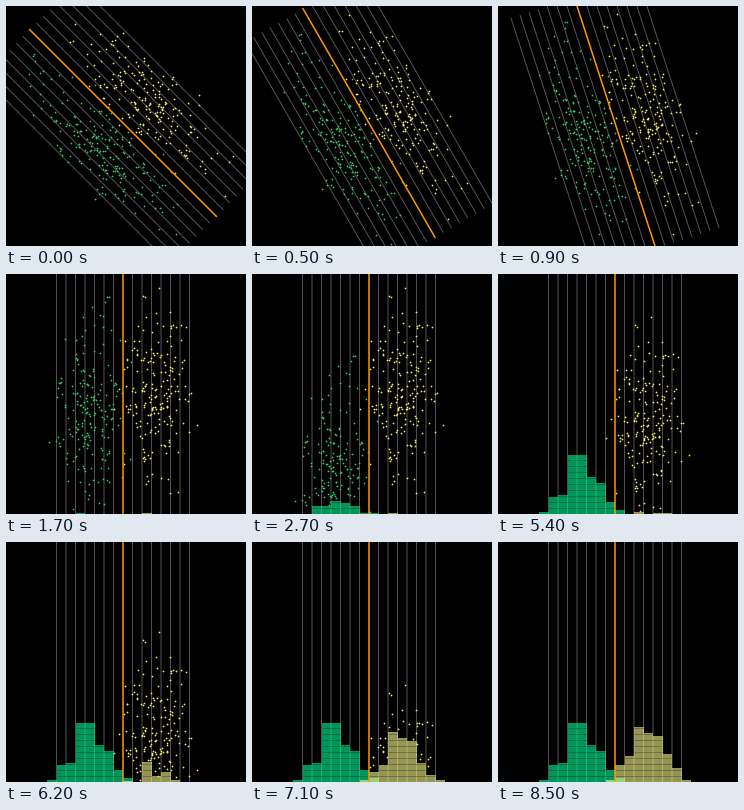
Write a matplotlib script that moves like this. It is 240x240 px and loops after 8.6 s.

```python
import numpy as np
import matplotlib.pyplot as plt
from matplotlib.animation import FuncAnimation
from matplotlib.collections import LineCollection
from matplotlib.patches import Rectangle

SIZE, DPI = 240, 100
PX = 72 / DPI
FRAMES, STEP = 86, 100
MID, HALF = 117, 132           # pivot and half length of the lines
BIN = 9.5
SPEED = 5.88                   # fall per frame
UNIT = 1.2                     # bar height per point
TURN = 15                      # frames until upright
ROW = 6                        # spacing of the stripes in a bar

rng = np.random.default_rng(12)


def rotate(pts, angle):
    u, v = (np.asarray(pts, float) - MID).T
    c, s = np.cos(angle), np.sin(angle)
    return np.column_stack([MID + u * c + v * s, MID - u * s + v * c])


class Cloud:
    """Normal cloud sorted into bins, each point falling onto its bar."""

    def __init__(self, ax, profile, left, mean, spread, start, dot, fill):
        self.start = start
        self.bins, self.bars = [], []
        for i, n in enumerate(profile):
            x = left + i * BIN
            top = mean - spread * np.sqrt(2 * np.log(n))
            xs = rng.uniform(x, x + BIN, n)
            ys = np.maximum(rng.normal(mean, spread, n), top)
            self.bins.append(np.column_stack([xs, -np.sort(-ys)]))
            self.bars.append(ax.add_patch(Rectangle(
                (x, SIZE), BIN, 0, fc=fill, alpha=0.6, lw=0, zorder=3)))
        self.dots, = ax.plot([], [], "o", ms=1.75 * PX, mew=0, color=dot,
                             snap=False, zorder=2)
        self.rows = ax.add_collection(LineCollection(
            [], colors="black", alpha=0.3, linewidths=0.8 * PX, zorder=4))

    def update(self, frame, angle):
        drop = SPEED * max(0, frame - self.start)
        flying, rows = [], []
        for pts, bar in zip(self.bins, self.bars):
            k = 0
            if frame >= TURN:
                while k < len(pts) and pts[k, 1] + drop >= SIZE - UNIT * k:
                    k += 1
            h = k * UNIT
            bar.set_y(SIZE - h)
            bar.set_height(h)
            x = bar.get_x()
            rows += [[(x, SIZE - y), (x + BIN, SIZE - y)]
                     for y in np.arange(ROW, h, ROW)]
            flying.append(pts[k:] + (0, drop))
        self.dots.set_data(*rotate(np.vstack(flying), angle).T)
        self.rows.set_segments(rows)


fig = plt.figure(figsize=(SIZE / DPI, SIZE / DPI), dpi=DPI, facecolor="black")
ax = fig.add_axes([0, 0, 1, 1])
ax.set_xlim(0, SIZE)
ax.set_ylim(SIZE, 0)
ax.axis("off")

offsets = [i * BIN for i in range(-7, 8) if i]
grid = ax.add_collection(LineCollection(
    [], colors="#5c5a60", linewidths=0.9 * PX, zorder=1))
grid.set_snap(False)
axis, = ax.plot([], [], color="#ff9a00", lw=1.5 * PX, snap=False, zorder=5)

green = Cloud(ax, [2, 14, 16, 49, 49, 31, 26, 10, 3], 41, 118, 44,
              14, "#2fd06a", "#00fa96")
yellow = Cloud(ax, [2, 14, 22, 46, 41, 38, 23, 12, 2], 107.5, 120, 42,
               49, "#f0f060", "#fafa8c")


def line(offset, angle):
    x = MID + offset
    return rotate([(x, MID - HALF), (x, MID + HALF)], angle)


def draw(frame):
    angle = np.radians(45 * max(0, 1 - frame / TURN))
    grid.set_segments([line(d, angle) for d in offsets])
    axis.set_data(*line(0, angle).T)
    for cloud in (green, yellow):
        cloud.update(frame, angle)


anim = FuncAnimation(fig, draw, frames=FRAMES, interval=STEP,
                     init_func=lambda: draw(0), repeat=True, repeat_delay=0)
plt.show()
```
